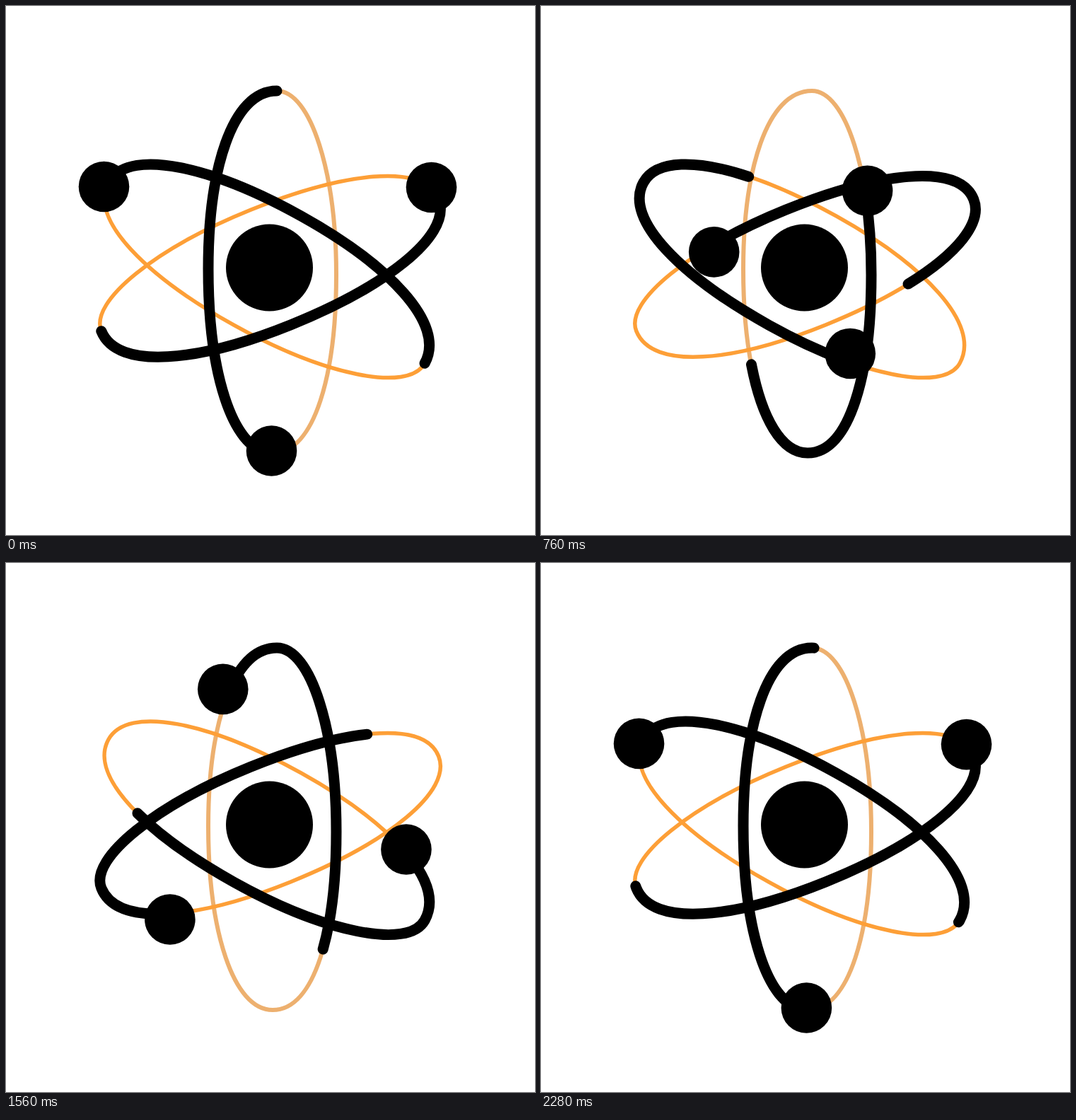
An HTML page that plays this animation: 748 by 748 pixels, repeating every 2.3 s.

```html
<!DOCTYPE html>
<html lang="en">
<head>
<meta charset="utf-8">
<title>Atom</title>
<style>
  html, body { margin: 0; width: 100%; height: 100%; overflow: hidden; background: #fff; }
  svg { display: block; width: 100vw; height: 100vh; }
  path { fill: none; }
  .ring { stroke: #fd9f37; stroke-width: 5.5; }
  .ring.soft { stroke: #edb06f; stroke-width: 6; }
  .trail { stroke: #000; stroke-width: 15; stroke-linecap: round; }
</style>
</head>
<body>
<svg viewBox="0 0 748 748">
  <g id="rings"></g>
  <g id="trails"></g>
  <g id="electrons"></g>
  <circle cx="372.5" cy="370" r="61.5"/>
</svg>
<script>
const LOOP = 2300, TICK = 20, STEPS = 110, MID = 54;

// Each electron swings from a to b and back, with two handles per half.
// mid: where the trail's tail rests halfway, in half turns.
const orbits = [
  { x: 377.5, y: 376, turn: 0, sx: 1, sy: 1, mid: 1.053, soft: true,
    a: [375.5, 629], b: [374.5, 116],
    out: [[499.8, 635.2], [504.4, 121.5]],
    back: [[246, 106.6], [241.2, 629.7]] },
  { x: 369.7, y: 375.2, turn: 119.1, sx: 1, sy: 1.006, mid: 1.053,
    a: [138.5, 255.5], b: [594, 490.5],
    out: [[84.8, 336.8], [552, 595.5]],
    back: [[653.9, 381.8], [192.9, 160.4]] },
  { x: 374.1, y: 368.6, turn: -112, sx: 0.95, sy: 1, mid: 1.041,
    a: [601.5, 256.5], b: [143.5, 470],
    out: [[551.5, 167], [113.6, 374.6]],
    back: [[202.6, 589.9], [647, 366.6]] }
];

function add(tag, attrs, parent) {
  const el = document.createElementNS('http://www.w3.org/2000/svg', tag);
  for (const key in attrs) el.setAttribute(key, attrs[key]);
  parent.append(el);
  return el;
}

function ringPath(sx, sy) {
  const scale = n => n.map((v, i) => v * (i % 2 ? sy : sx)).join(' ');
  const curve = (...n) => 'C' + scale(n);
  return 'M' + scale([5.5, -256]) +
    curve(-58.5, -256, -91.5, -143, -91.5, -4) +
    curve(-91.5, 144, -56.5, 256, -0.5, 256) +
    curve(59.5, 256, 89.5, 143, 89.5, 4) +
    curve(89.5, -140, 53.5, -256, 5.5, -256) + 'Z';
}

function bezier(t, p0, p1, p2, p3) {
  const u = 1 - t;
  return u * u * u * p0 + 3 * t * u * u * p1 + 3 * t * t * u * p2 + t * t * t * p3;
}

// Ease with curve (x1, 0, x2, 1), solved by bisection.
function ease(x, x1, x2) {
  let lo = 0, hi = 1, t = 0.5;
  for (let i = 0; i < 30; i++) {
    t = (lo + hi) / 2;
    if (bezier(t, 0, x1, x2, 1) < x) lo = t; else hi = t;
  }
  return bezier(t, 0, 0, 1, 1);
}

// Travelled share of a half orbit to curve parameter.
const along = s => s + 0.052 * Math.sin(2 * Math.PI * s) + 0.01 * Math.sin(4 * Math.PI * s);

const layer = id => document.getElementById(id);
for (const o of orbits) {
  const shape = {
    d: ringPath(o.sx, o.sy),
    transform: `translate(${o.x} ${o.y}) rotate(${o.turn})`
  };
  add('path', { ...shape, class: o.soft ? 'ring soft' : 'ring' }, layer('rings'));
  o.trail = add('path', { ...shape, class: 'trail', pathLength: 2 }, layer('trails'));
  o.dot = add('circle', { r: 35.8 }, layer('electrons'));
  o.halves = [[o.a, ...o.out, o.b], [o.b, ...o.back, o.a]];
}

function draw(ms) {
  // The picture holds for one extra tick in every 28.
  const tick = Math.floor(ms / TICK);
  const step = tick - Math.floor((tick + 27) / 28);
  const half = step < MID ? 0 : 1;
  const p = half
    ? ease((step - MID) / (STEPS - MID), 0.74, 0.261)
    : ease(step / MID, 0.861, 0.435);
  const t = along(p);

  for (const o of orbits) {
    const [x, y] = [0, 1].map(i => bezier(t, ...o.halves[half].map(pt => pt[i])));
    o.dot.setAttribute('cx', x);
    o.dot.setAttribute('cy', y);

    const tail = half ? o.mid + (1.995 - o.mid) * p : o.mid * p;
    const span = 1 + half + p - tail;
    o.trail.setAttribute('stroke-dasharray', `${span} ${2 - span}`);
    o.trail.setAttribute('stroke-dashoffset', -tail);
  }
}

function frame() {
  draw(performance.now() % LOOP);
  requestAnimationFrame(frame);
}
frame();
</script>
</body>
</html>
```
